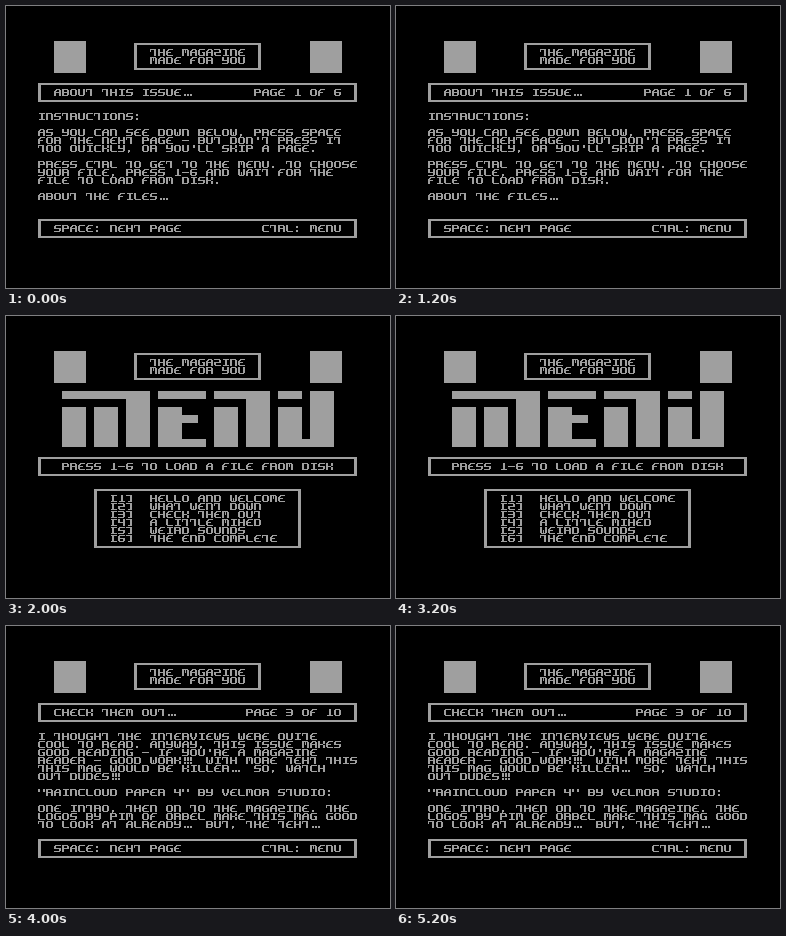
An HTML page with a canvas for the animation above (6000 ms loop, 384 px wide and 282 px high).

```html
<!DOCTYPE html>
<html lang="en">
<head>
<meta charset="utf-8">
<title>Disk magazine</title>
<style>
html, body { margin: 0; width: 100%; height: 100%; overflow: hidden; background: #000; }
canvas { display: block; }
</style>
</head>
<body>
<canvas id="screen" width="384" height="282"></canvas>
<script>
const ctx = document.getElementById('screen').getContext('2d');
const GREY = '#9f9f9f';
const CELL = 8, LEFT = 32, TOP = 35;
const PAGE_MS = 2000;

// Strokes of the lettering inside one cell: x, y, width, height.
const STROKES = {
  a: [0, 0, 7, 1], m: [0, 3, 7, 1], b: [0, 6, 7, 1],
  h: [0, 0, 6, 1], n: [4, 3, 3, 1], o: [0, 3, 5, 1],
  l: [0, 0, 2, 4], L: [0, 3, 2, 4],
  r: [5, 0, 2, 4], R: [5, 3, 2, 4],
  i: [3, 0, 2, 7], t: [0, 0, 1, 3], T: [4, 0, 2, 7],
  c: [3, 0, 1, 4], C: [3, 3, 1, 4],
  d: [0, 0, 2, 3], D: [0, 4, 2, 3], e: [5, 0, 2, 3], E: [5, 4, 2, 3],
  j: [1, 4, 2, 2], J: [4, 4, 2, 2], k: [2, 6, 3, 1],
  g: [1, 0, 6, 1], f: [1, 6, 6, 1], s: [2, 0, 2, 7],
  p: [2, 5, 2, 2], u: [2, 1, 2, 2], q: [2, 7, 1, 1], v: [3, 0, 2, 3],
  x: [2, 5, 2, 2], y: [5, 5, 2, 2], z: [8, 5, 2, 2]
};

// Corner pixels that are left open on rounded letters.
const CORNERS = { 1: [0, 0], 2: [6, 0], 3: [0, 6], 4: [6, 6] };

// A caret marks a slanted top left corner.
const GLYPHS = {
  A: 'almLrR^2', B: 'albmLrR24', C: 'alLb13', D: 'alLrRb24', E: 'aloLb^3',
  F: 'aloL^', G: 'alLbRn13', H: 'lLmrR', I: 'gif', J: 'rRbL34',
  K: 'lLoeE', L: 'lLb3', M: 'alLrRc2', N: 'alLrR2', O: 'alLrRb1234',
  P: 'alrmL2', Q: 'alLrRby1234', R: 'alrmLE2', S: 'almRb14', T: 'htT',
  U: 'lLrRb34', V: 'lrjJk', W: 'lLrRbC34', X: 'deoEDn', Y: 'lrmRb4',
  Z: 'armLb23', 0: 'alLrRb1234', 1: 'vif', 2: 'armLb23', 3: 'armRb24',
  4: 'lrmR', 5: 'almRb14', 6: 'almLRb134',
  '.': 'p', ':': 'pu', ',': 'pq', "'": 'v', '"': 'de', '-': 'm',
  '[': 'sgf', ']': 'Thk', '…': 'xyz'
};

function rect(x, y, w, h, color = GREY) {
  ctx.fillStyle = color;
  ctx.fillRect(x, y, w, h);
}

function glyph(char, x, y) {
  for (const part of GLYPHS[char] || '') {
    if (STROKES[part]) {
      const [dx, dy, w, h] = STROKES[part];
      rect(x + dx, y + dy, w, h);
    } else if (CORNERS[part]) {
      const [dx, dy] = CORNERS[part];
      rect(x + dx, y + dy, 1, 1, '#000');
    } else {
      rect(x, y, 2, 1, '#000');
      rect(x, y + 1, 1, 1, '#000');
      rect(x + 2, y + 1, 1, 1);
    }
  }
}

function exclamations(x, y) {
  for (const dx of [2, 5, 8]) {
    rect(x + dx, y, 2, 4);
    rect(x + dx, y + 5, 2, 2);
  }
}

// Dots and exclamation marks come as triples that share two cells.
function text(string, col, row) {
  const y = TOP + row * CELL;
  let x = LEFT + col * CELL;
  for (const char of string.replaceAll('!!!', '‼')) {
    if (char === '‼') exclamations(x, y);
    else glyph(char, x, y);
    x += '…‼'.includes(char) ? 2 * CELL : CELL;
  }
}

function lines(content, row, col = 0) {
  content.split('\n').forEach((line, i) => text(line, col, row + i));
}

// Box whose border runs through the middle of its outer cells.
function box(col, row, cols, rows) {
  const x = LEFT + col * CELL, y = TOP + row * CELL + 2;
  const w = cols * CELL - 1, h = rows * CELL - 5;
  rect(x, y, w, h);
  rect(x + 3, y + 2, w - 6, h - 4, '#000');
}

function header() {
  for (const center of [64, 320]) rect(center - 16, TOP, 32, 32);
  box(12, 0, 16, 4);
  lines('THE MAGAZINE\nMADE FOR YOU', 1, 14);
}

function article(title, page, paragraphs) {
  box(0, 5, 40, 3);
  text(title, 2, 6);
  text(page, 38 - page.length, 6);
  for (const [row, content] of paragraphs) lines(content, row);
  box(0, 22, 40, 3);
  text('SPACE: NEXT PAGE', 2, 23);
  text('CTRL: MENU', 28, 23);
}

function menuTitle() {
  const block = (col, row, cols, rows) =>
    rect(LEFT + col * CELL, TOP + row * CELL, cols * CELL, rows * CELL);
  for (const col of [3, 7, 15, 22, 30]) block(col, 7, 3, 5);
  for (const col of [11, 26, 34]) block(col, 5, 3, 7);
  block(3, 5, 11, 1);
  block(15, 5, 6, 1);
  block(15, 8, 5, 1);
  block(15, 11, 6, 1);
  block(22, 5, 7, 1);
  block(30, 5, 3, 1);
  block(30, 11, 7, 1);
}

function menu() {
  menuTitle();
  box(0, 13, 40, 3);
  text('PRESS 1-6 TO LOAD A FILE FROM DISK', 3, 14);
  box(7, 17, 26, 8);
  ['HELLO AND WELCOME', 'WHAT WENT DOWN', 'CHECK THEM OUT',
    'A LITTLE MIXED', 'WEIRD SOUNDS', 'THE END COMPLETE'
  ].forEach((item, i) => {
    text(`[${i + 1}]`, 9, 18 + i);
    text(item, 14, 18 + i);
  });
}

const pages = [
  () => article('ABOUT THIS ISSUE…', 'PAGE 1 OF 6', [
    [9, 'INSTRUCTIONS:'],
    [11, `AS YOU CAN SEE DOWN BELOW, PRESS SPACE
FOR THE NEXT PAGE - BUT DON'T PRESS IT
TOO QUICKLY, OR YOU'LL SKIP A PAGE.`],
    [15, `PRESS CTRL TO GET TO THE MENU. TO CHOOSE
YOUR FILE, PRESS 1-6 AND WAIT FOR THE
FILE TO LOAD FROM DISK.`],
    [19, 'ABOUT THE FILES…']
  ]),
  menu,
  () => article('CHECK THEM OUT…', 'PAGE 3 OF 10', [
    [9, `I THOUGHT THE INTERVIEWS WERE QUITE
COOL TO READ. ANYWAY, THIS ISSUE MAKES
GOOD READING - IF YOU'RE A MAGAZINE
READER - GOOD WORK!!! WITH MORE TEXT THIS
THIS MAG WOULD BE KILLER… SO, WATCH
OUT DUDES!!!`],
    [16, '"RAINCLOUD PAPER 4" BY VELMOR STUDIO:'],
    [18, `ONE INTRO, THEN ON TO THE MAGAZINE. THE
LOGOS BY PIM OF ORBEL MAKE THIS MAG GOOD
TO LOOK AT ALREADY… BUT, THE TEXT…`]
  ])
];

const start = performance.now();
let shown = -1;

function frame() {
  const page = Math.floor((performance.now() - start) / PAGE_MS) % pages.length;
  if (page !== shown) {
    shown = page;
    rect(0, 0, 384, 282, '#000');
    header();
    pages[page]();
  }
  requestAnimationFrame(frame);
}
frame();
</script>
</body>
</html>
```
